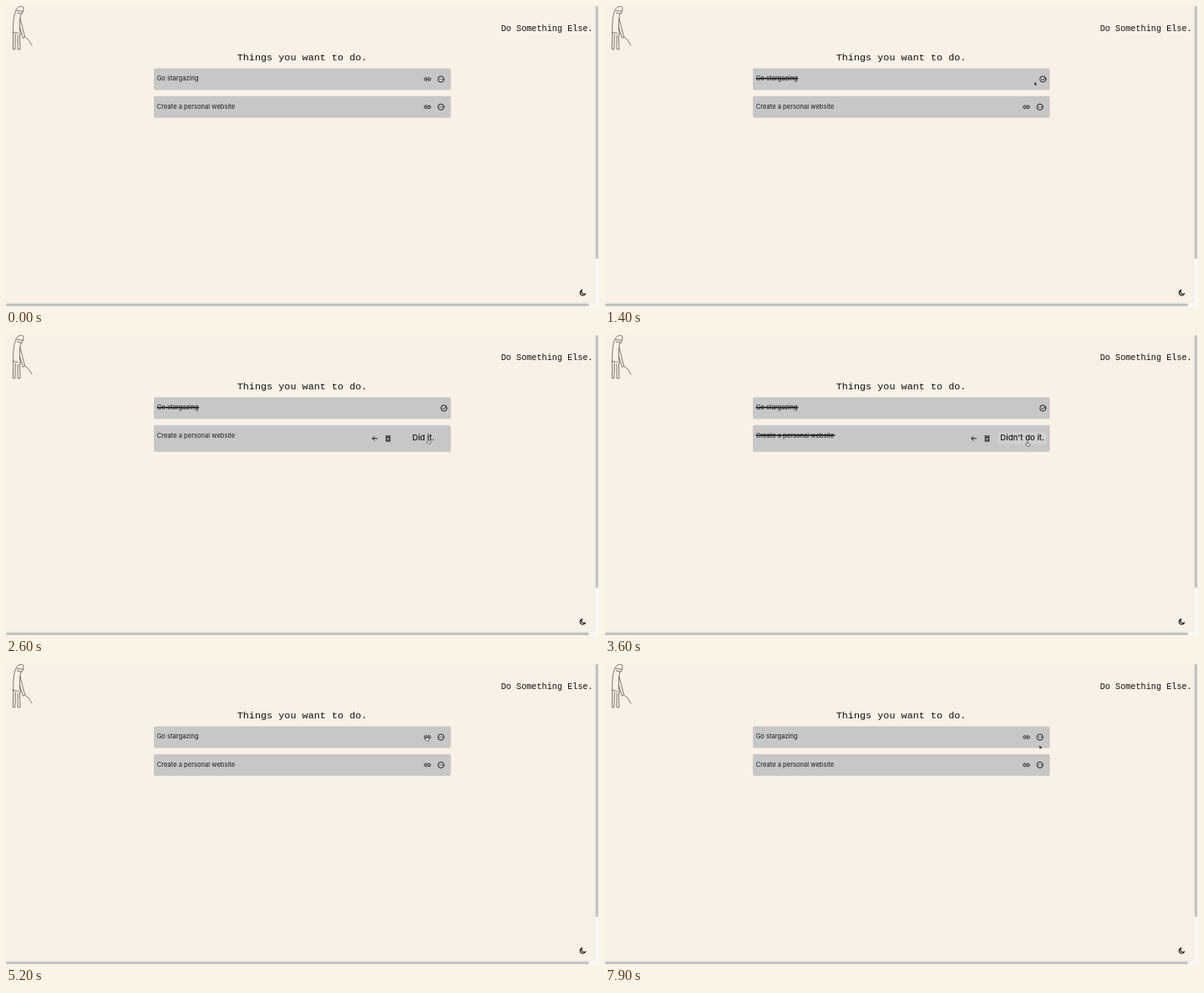
Animation of 710 by 360 pixels, one loop 8 s. Source, as an HTML page:

```html
<!DOCTYPE html>
<html lang="en">
<head>
<meta charset="utf-8">
<title>Things you want to do</title>
<style>
  html, body { margin: 0; width: 100%; height: 100%; overflow: hidden; background: #f9f1e6; }
  svg { display: block; width: 710px; height: 360px; }
  .mono { font-family: "Liberation Mono", "Courier New", monospace; fill: #111; }
  .item { font: 7.6px Inter, sans-serif; fill: #1c1c1c; }
  .label { font: 500 9.6px Inter, sans-serif; fill: #161616; text-anchor: middle; }
  .ink, .sketch { fill: none; stroke: #1c1c1c; stroke-linecap: round; stroke-linejoin: round; }
  .sketch { stroke: #45423e; stroke-width: .7; }
</style>
</head>
<body>
<svg viewBox="0 0 710 360">
  <defs>
    <g id="link" class="ink">
      <path d="M-.9 -1.7H-2a1.7 1.7 0 0 0 0 3.4H-.9M.9 -1.7H2a1.7 1.7 0 0 1 0 3.4H.9M-1.5 0H1.5"/>
    </g>
    <g id="face" class="ink">
      <circle r="3.6"/>
      <path d="M-1.4 0h.2M1.2 0h.2" stroke-width="1.1"/>
    </g>
    <g id="check" class="ink"><circle r="3.6"/><path d="M-1.7 .1L-.5 1.3L2.2 -1.5"/></g>
    <g id="back" class="ink"><path d="M2.9 0H-2.7M-.3 -2.5L-2.8 0L-.3 2.5"/></g>
    <g id="bin" class="ink">
      <path d="M-2.8 -3H2.8M-2.2 -1.4H2.2V3.1H-2.2Z" stroke-width="1.1"/>
      <path d="M-.8 .1L.8 1.7M.8 .1L-.8 1.7" stroke-width=".8"/>
    </g>
  </defs>

  <rect width="710" height="360" fill="#f9f1e6"/>
  <path d="M705 0H710V360H0V355H705Z" fill="#faf8f5"/>
  <path d="M704.7 0V354.8H0" fill="none" stroke="#ebe5dc" stroke-width=".7"/>
  <rect x="705.8" width="3.4" height="302.5" rx="1.5" fill="#c2c2c2"/>
  <rect y="355.8" width="698" height="3.2" rx="1.5" fill="#c2c2c2"/>

  <g class="sketch">
    <path d="M8.8 32C8.4 22 9 11 12 5C14 .8 18 -.6 20.6 1.2C21.4 4 20.4 7 19 9.4L13.2 8"/>
    <path d="M13 5.4L20.2 6.4"/>
    <path d="M18 9.4C16 15 16 25 17.2 34M8.8 31.5L14.6 32.5"/>
    <path d="M8.8 32L8.4 51.6L10.8 52L11.4 34M14.2 35L14 51.6L17 52L16.4 34"/>
    <path d="M17 15C19 22 20.5 30 22.6 37L20.4 38.4L16.5 26M22.6 37L27 40.5L31 47"/>
  </g>

  <text class="mono" x="592.7" y="30.2" font-size="10.2">Do Something Else.</text>
  <text class="mono" x="276.7" y="64.6" font-size="11.8">Things you want to do.</text>
  <path class="ink" stroke-width="1.1" d="M690 339.7A3.3 3.3 0 1 0 693.8 343.9A2.7 2.7 0 0 1 690 339.7Z"/>

  <g id="rows"></g>

  <path id="arrow" d="M-1 -2L-.7 1.8L.3 .9L1.1 2.3L1.8 1.9L1.1 .6L2.3 .4Z" fill="#222"/>
  <path id="hand" d="M-.9 -2.8Q-.2 -3.3 .2 -2.5V-.5L2.2 .1Q2.8 .4 2.6 1.4L2.1 3H-.8L-2.5 .9Q-2.3 .1 -.9 .8Z"
    fill="#eee" stroke="#444" stroke-width=".7" stroke-linejoin="round"/>
</svg>
<script>
const LOOP = 8000, STEP = 100, FADE = 200, TRAVEL = 300;
const TOP = 74.4, CLOSED = 26.1, GROWTH = 5.9, GAP = 7.2;
const $ = id => document.getElementById(id);

function rise(t, from, span) {
  const p = Math.min(1, Math.max(0, (t - from) / span));
  return p * p * (3 - 2 * p);
}

// 1 inside any [on, off] span, with eased edges.
const level = (spans, t) =>
  spans.reduce((sum, [on, off]) => sum + rise(t, on, FADE) - rise(t, off, FADE), 0);

const items = [
  { text: "Go stargazing", width: 50.5, done: [700, 4500],
    open: [[200, 800], [3600, 4800]], hover: [[3800, 4500]] },
  { text: "Create a personal website", width: 94.5, done: [3100, 3700],
    open: [[1700, 3600]], hover: [[3550, 3700]] }
];

// Pointer moves: start time, goal, shape.
const moves = [
  [200, 521, 90, "hand"], [400, 507, 93, "hand"], [700, 442, 92, "hand"],
  [1000, 515, 93, "arrow"], [1500, 506, 127, "hand"], [3000, 506, 130, "hand"],
  [3600, 525, 92, "hand"], [4500, 442, 92, "hand"], [4900, 504, 89, "hand"],
  [7200, 506, 93, "arrow"], [7500, 521, 99.5, "arrow"]
];

const use = (id, x, y) => `<use href="#${id}" x="${x}" y="${y}"/>`;

function drawRow(item, y, open, t) {
  const done = t >= item.done[0] && t < item.done[1];
  const mid = y + 13.1;
  let out = `<rect x="177" y="${y}" width="355.6" height="${CLOSED + GROWTH * open}" rx="2" fill="#c6c7c6"/>
    <text class="item" x="180.7" y="${y + 14.9}">${item.text}</text>`;
  if (done) out += `<rect x="180.7" y="${y + 11.5}" width="${item.width}" height="1.5" fill="#151515"/>`;
  if (open > .5) {
    out += use("back", 441.5, y + 16.1) + use("bin", 457.5, y + 16.1) +
      `<rect x="470.7" y="${y + 8.7}" width="58" height="14.2" rx="1.5" fill="#fff" opacity="${level(item.hover, t)}"/>
      <text class="label" x="499.7" y="${y + 18.4}">${done ? "Didn't do it." : "Did it."}</text>`;
  } else if (done) {
    out += use("check", 524.3, mid);
  } else {
    out += use("link", 504.6, mid) + use("face", 520.8, mid);
  }
  return out;
}

function drawPointer(t) {
  let [, x, y] = moves[0], shape = "";
  for (const [at, goalX, goalY, look] of moves) {
    if (t < at) break;
    const p = rise(t, at, TRAVEL);
    x += (goalX - x) * p;
    y += (goalY - y) * p;
    shape = look;
  }
  for (const id of ["arrow", "hand"]) {
    $(id).setAttribute("visibility", id === shape ? "visible" : "hidden");
    $(id).setAttribute("transform", `translate(${x} ${y})`);
  }
}

function render(t) {
  let y = TOP, out = "";
  for (const item of items) {
    const open = level(item.open, t);
    out += drawRow(item, y, open, t);
    y += CLOSED + GROWTH * open + GAP;
  }
  $("rows").innerHTML = out;
  drawPointer(t);
}

const start = performance.now();
function tick() {
  const t = (performance.now() - start) % LOOP;
  render(Math.floor(t / STEP) * STEP);
  requestAnimationFrame(tick);
}
tick();
</script>
</body>
</html>
```
